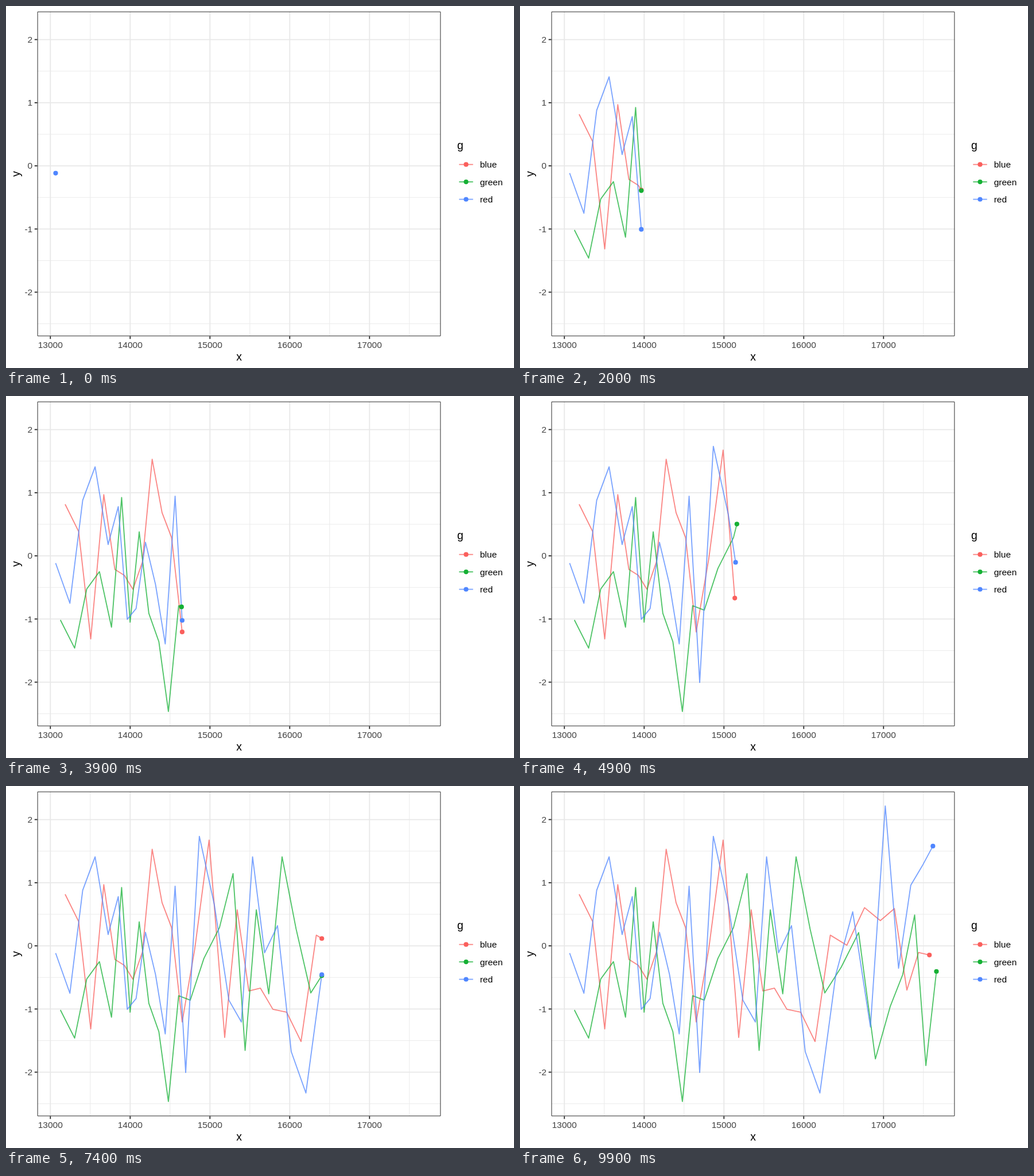
An HTML page with a canvas for the animation above (10000 ms loop, 885x632 px).

```html
<!DOCTYPE html>
<html lang="en">
<head>
<meta charset="utf-8">
<title>Line chart reveal</title>
<style>
html, body { margin: 0; width: 885px; height: 632px; overflow: hidden; background: #fff; }
canvas { display: block; }
</style>
</head>
<body>
<canvas id="stage" width="885" height="632"></canvas>
<script>
const ctx = document.getElementById('stage').getContext('2d');
const FRAMES = 100, STEP = 100;
const PANEL = { l: 54.6, t: 9.7, r: 757.4, b: 576.5 };
const LINE = 1.85, DOT = 4.1, ALPHA = 0.75;
const INK = '#2b2b2b', LABEL = '#424242';
const FONT = '"Liberation Sans", Arial, sans-serif';

const px = v => 77.3 + (v - 13000) * 0.139;
const py = v => 279.1 - v * 110.25;

// x drifts evenly between these key values, one for every fourth row
const KEY_ROWS = 4;
const xKeys = [13066, 13304, 13506, 13724, 13893, 14035, 14192, 14360, 14519, 14696, 14924, 15185,
  15394, 15581, 15789, 16019, 16264, 16540, 16836, 17084, 17293, 17487, 17663];

// Noisy readings; rows cycle through red, green, blue
const values = [
  -.115, -1.015, .817, -.75, -1.46, .386, .88, -.525, -1.315, 1.41, -.25, .97,
  .18, -1.13, -.215, .78, .925, -.31, -1.005, -1.05, -.53, -.835, .38, -.1,
  .215, -.91, 1.53, -.455, -1.36, .685, -1.395, -2.465, .29, .945, -.79, -1.205,
  -2.005, -.86, -.045, 1.735, -.2, 1.675, .655, .29, -1.45, -.86, 1.145, .57,
  -1.205, -1.655, -.715, 1.41, .57, -.67, -.11, -.76, -1.005, .32, 1.41, -1.05,
  -1.675, .265, -1.515, -2.33, -.745, .17, -.455, -.335, .01, .54, .21, .605,
  -1.285, -1.79, .4, 2.215, -.96, .59, -.355, -.455, -.7, .96, .49, -.105,
  1.27, -1.895, -.145, 1.58, -.405];

const groups = [
  { name: 'blue', color: '#fa5f5c', first: 2 },
  { name: 'green', color: '#15b034', first: 1 },
  { name: 'red', color: '#4f86ff', first: 0 }
];

const mix = (a, b, f) => a + (b - a) * f;

function roundEven(v) {
  const n = Math.floor(v);
  return v - n === 0.5 ? n + n % 2 : Math.round(v);
}

function xAt(row) {
  const i = Math.min(Math.floor(row / KEY_ROWS), xKeys.length - 2);
  return mix(xKeys[i], xKeys[i + 1], row / KEY_ROWS - i);
}

const points = values.map((v, row) => ({
  x: px(xAt(row)),
  y: py(v),
  at: roundEven(row * (FRAMES - 1) / (values.length - 1))
}));
for (const g of groups) g.pts = points.filter((p, row) => row % 3 === g.first);

function line(pts, color, width, alpha = 1) {
  ctx.globalAlpha = alpha;
  ctx.strokeStyle = color;
  ctx.lineWidth = width;
  ctx.lineJoin = 'round';
  ctx.beginPath();
  pts.forEach(p => ctx.lineTo(p.x, p.y));
  ctx.stroke();
  ctx.globalAlpha = 1;
}

const seg = (x1, y1, x2, y2, color, width, alpha) =>
  line([{ x: x1, y: y1 }, { x: x2, y: y2 }], color, width, alpha);

function dot(x, y, color) {
  ctx.fillStyle = color;
  ctx.beginPath();
  ctx.arc(x, y, DOT, 0, 2 * Math.PI);
  ctx.fill();
}

function text(str, x, y, size, color, align) {
  ctx.font = `${size}px ${FONT}`;
  ctx.fillStyle = color;
  ctx.textAlign = align;
  ctx.fillText(str, x, y);
}

function drawGrid(shift, color, width) {
  for (let i = 0; i < 5; i++) {
    const x = px(13000 + 1000 * (i + shift));
    const y = py(2 - i - shift);
    seg(x, PANEL.t, x, PANEL.b, color, width);
    seg(PANEL.l, y, PANEL.r, y, color, width);
  }
}

function drawAxes() {
  const { l, t, r, b } = PANEL;
  ctx.strokeStyle = INK;
  ctx.lineWidth = 1;
  ctx.strokeRect(l + 0.5, t + 0.5, r - l - 1, b - t - 1);
  for (let i = 0; i < 5; i++) {
    const xv = 13000 + 1000 * i, yv = 2 - i;
    const x = px(xv), y = py(yv);
    seg(x, b, x, b + 4.8, INK, LINE);
    seg(l - 4.8, y, l, y, INK, LINE);
    text(String(xv), x, 596.6, 15.5, LABEL, 'center');
    text(String(yv), 46.2, y + 5.2, 15.5, LABEL, 'right');
  }
  text('x', 406, 618.7, 19.4, '#000', 'center');
  ctx.save();
  ctx.translate(23.5, 293.1);
  ctx.rotate(-Math.PI / 2);
  text('y', 0, 0, 19.4, '#000', 'center');
  ctx.restore();
}

function drawLegend() {
  text('g', 786, 250, 19.4, '#000', 'left');
  groups.forEach((g, i) => {
    const y = 276.7 + 30.4 * i;
    seg(789.3, y, 813.7, y, g.color, LINE, ALPHA);
    dot(801.5, y, g.color);
    text(g.name, 825.7, y + 5.6, 15.5, '#000', 'left');
  });
}

// Points passed so far, plus the moving tip
function reveal(pts, k) {
  const path = pts.filter(p => p.at <= k);
  const a = path[path.length - 1], b = pts[path.length];
  if (a && b && k > a.at) {
    const f = (k - a.at) / (b.at - a.at);
    path.push({ x: mix(a.x, b.x, f), y: mix(a.y, b.y, f) });
  }
  return path;
}

function draw(k) {
  ctx.fillStyle = '#fff';
  ctx.fillRect(0, 0, 885, 632);
  drawGrid(0.5, '#ebebeb', 1);
  drawGrid(0, '#e8e8e8', LINE);
  const paths = groups.map(g => reveal(g.pts, k));
  paths.forEach((p, i) => { if (p.length > 1) line(p, groups[i].color, LINE, ALPHA); });
  paths.forEach((p, i) => {
    const tip = p[p.length - 1];
    if (tip) dot(tip.x, tip.y, groups[i].color);
  });
  drawAxes();
  drawLegend();
}

const start = performance.now();
function tick() {
  const t = Math.max(0, performance.now() - start);
  draw(Math.floor(t / STEP) % FRAMES);
  requestAnimationFrame(tick);
}
tick();
</script>
</body>
</html>
```
